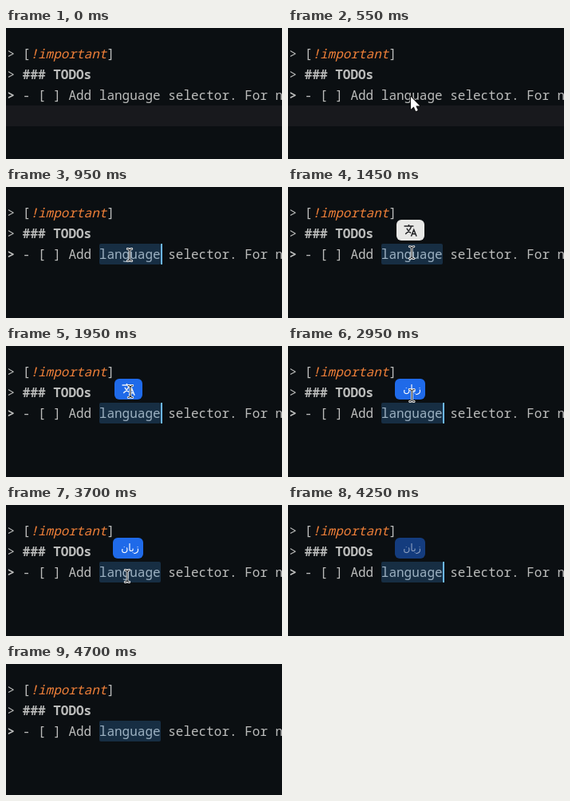
An HTML page with a canvas for the animation above (4.85 s loop, 346 by 164 pixels).

```html
<!DOCTYPE html>
<html lang="en">
<head>
<meta charset="utf-8">
<title>Inline translation</title>
<style>
html, body { margin: 0; width: 100%; height: 100%; overflow: hidden; background: #0b0f12; }
canvas { display: block; width: 346px; height: 164px; }
</style>
</head>
<body>
<canvas id="stage"></canvas>
<script>
const W = 346, H = 164, LOOP = 4850, STEP = 50;
const MONO = '"Noto Sans Mono", "DejaVu Sans Mono", monospace';
const LEFT = 1.6, CELL = 9.6;
const GREY = '#bcbdbc', ORANGE = '#ee7f38';

const canvas = document.getElementById('stage');
const ctx = canvas.getContext('2d');
const dpr = window.devicePixelRatio || 1;
canvas.width = W * dpr;
canvas.height = H * dpr;

const icon = new Path2D('M1 5H17M9 2V5M5.5 8.5C7 12 9.5 14.5 12.5 16.5M13.2 5C12 10 8 14.5 3.2 18.3M13 22L17.5 10.8L22 22M14.8 18H20.2');
const arrow = new Path2D('M0 0V15.8L3.7 12.4L6.2 18.2L8.8 17.1L6.3 11.4H11.2Z');
const beam = new Path2D('M-2.8 -7.5Q0 -7.5 0 -5.5Q0 -7.5 2.8 -7.5M0 -5.5V5.5M-2.8 7.5Q0 7.5 0 5.5Q0 7.5 2.8 7.5');

const clamp = v => Math.max(0, Math.min(1, v));
const ramp = (t, a, b) => clamp((t - a) / (b - a));
const smooth = v => v * v * (3 - 2 * v);
const mix = (a, b, k) => a + (b - a) * k;
const mixRgb = (a, b, k) => `rgb(${a.map((v, i) => Math.round(mix(v, b[i], k)))})`;

// Pointer keys: time, x, y
const track = [
  [0, 190, 170], [500, 154, 86], [700, 154, 86], [800, 155, 85],
  [1350, 155, 85], [1850, 156, 57], [2850, 156, 57],
  [3250, 152, 89], [3700, 152, 89], [3900, 152, 98], [4050, 152, 104]
];

function pointerAt(t) {
  const i = track.findIndex(key => key[0] > t);
  if (i < 0) return track[track.length - 1].slice(1);
  const [t0, x0, y0] = track[i - 1], [t1, x1, y1] = track[i];
  const k = smooth(ramp(t, t0, t1));
  return [mix(x0, x1, k), mix(y0, y1, k)];
}

function write(str, col, y, color = GREY, style = '') {
  ctx.font = `${style} 16px ${MONO}`;
  ctx.fillStyle = color;
  ctx.fillText(str, LEFT + col * CELL, y);
}

function box(x, y, w, h, r, color) {
  ctx.fillStyle = color;
  ctx.beginPath();
  ctx.roundRect(x, y, w, h, r);
  ctx.fill();
}

function drawEditor(t) {
  const selected = t >= 800;
  ctx.fillStyle = '#0b0f12';
  ctx.fillRect(0, 0, W, H);
  if (!selected) {
    ctx.fillStyle = '#18191d';
    ctx.fillRect(0, 97, W, 26);
  }
  write('>', 0, 38);
  write('[', 2, 38);
  write('!important', 3, 38, ORANGE, 'italic 500');
  write(']', 13, 38);
  write('>', 0, 64);
  write('### TODOs', 2, 64, GREY, 'bold');
  write('>', 0, 90, GREY, 'bold');
  write('- [ ] Add language selector. For n', 2, 90);
  if (!selected) return;

  // The selection tints the text beneath it
  box(117, 71, 77, 26, 2, 'rgba(60, 140, 210, 0.25)');
  const caretOn = (t + 700) % 1200 < 600;
  if (caretOn) {
    ctx.fillStyle = '#6cb6f5';
    ctx.fillRect(194, 71, 2, 26);
  }
}

function drawIcon(color) {
  ctx.save();
  ctx.translate(144.8, 45.4);
  ctx.scale(0.74, 0.74);
  ctx.strokeStyle = color;
  ctx.lineWidth = 2;
  ctx.stroke(icon);
  ctx.restore();
}

function drawButton(t) {
  const alpha = ramp(t, 1100, 1300) * (1 - ramp(t, 4150, 4350));
  if (!alpha) return;
  const hover = ramp(t, 1600, 1800);
  const grow = ramp(t, 2250, 2450);
  const label = ramp(t, 2350, 2650);
  const flash = grow * (1 - ramp(t, 2550, 2850));
  const x = mix(136, 134, grow), w = mix(35, 38, grow);

  ctx.save();
  ctx.globalAlpha = alpha;
  box(x, 41, w, 26, 6, mixRgb([232, 232, 230], [31, 106, 233], hover));
  if (flash) box(x + 2, 43, w - 4, 22, 4, `rgba(190, 216, 250, ${flash * 0.7})`);
  if (grow < 1) {
    ctx.globalAlpha = alpha * (1 - grow);
    drawIcon(mixRgb([32, 33, 36], [235, 241, 250], hover));
  }
  if (label) {
    ctx.globalAlpha = alpha * label;
    ctx.font = '12.5px "DejaVu Sans", sans-serif';
    ctx.fillStyle = '#fff';
    ctx.textAlign = 'center';
    ctx.fillText('زبان', 153, 58);
  }
  ctx.restore();
}

function drawPointer(t) {
  const alpha = 1 - ramp(t, 4000, 4150);
  if (t < STEP || !alpha) return;
  const [x, y] = pointerAt(t);
  ctx.save();
  ctx.globalAlpha = alpha;
  ctx.translate(x, y);
  ctx.lineJoin = 'round';
  if (t < 750) {
    ctx.strokeStyle = '#111';
    ctx.lineWidth = 2;
    ctx.stroke(arrow);
    ctx.fillStyle = '#fff';
    ctx.fill(arrow);
  } else {
    ctx.lineCap = 'round';
    ctx.strokeStyle = '#f2f2f2';
    ctx.lineWidth = 2.8;
    ctx.stroke(beam);
    ctx.strokeStyle = '#15181b';
    ctx.lineWidth = 1;
    ctx.stroke(beam);
  }
  ctx.restore();
}

function frame() {
  const t = Math.floor((performance.now() % LOOP) / STEP) * STEP;
  ctx.setTransform(dpr, 0, 0, dpr, 0, 0);
  drawEditor(t);
  drawButton(t);
  drawPointer(t);
  requestAnimationFrame(frame);
}
frame();
</script>
</body>
</html>
```
